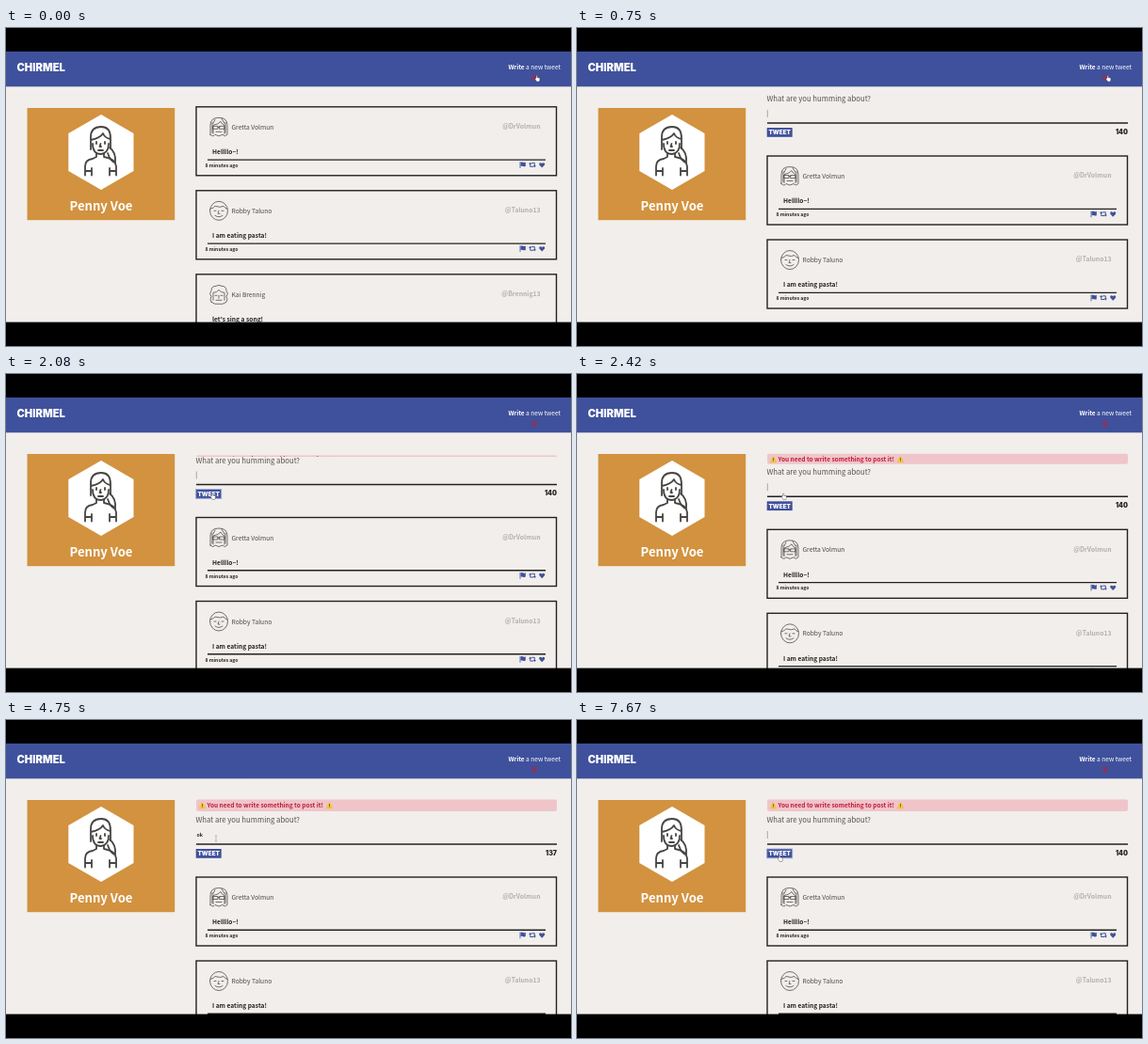
Recreate the animation shown at these times as an HTML page. Size 600 by 338 pixels, loop 8 s.

```html
<!DOCTYPE html>
<html lang="en">
<head>
<meta charset="utf-8">
<style>
html, body { margin: 0; height: 100%; overflow: hidden; background: #000; }
svg { display: block; width: 600px; height: 338px; }
text { font-family: "Noto Sans CJK JP", "Noto Sans CJK SC", "Noto Sans CJK", "Open Sans", sans-serif; fill: #252422; white-space: pre; }
.b { font-weight: 700; }
.block { font-family: Inter, sans-serif; font-weight: 900; }
.line { fill: none; stroke: #474543; stroke-linecap: round; stroke-linejoin: round; }
.rule { stroke: #222; stroke-width: 1.4; fill: none; }
.blue { fill: #3f519c; }
.white { fill: #fff; }
.end { text-anchor: end; }
</style>
</head>
<body>
<svg viewBox="0 0 600 338">
  <defs>
    <clipPath id="errClip"><rect id="errWindow" x="202" width="383" rx="1.8"/></clipPath>
    <g id="warn">
      <path d="M3.5 .5L6.8 6.8H.2Z" fill="#f8cf2c" stroke="#f0b921" stroke-width=".6" stroke-linejoin="round"/>
      <path d="M3.5 2.4V4.6M3.5 5.5V6.1" stroke="#333" stroke-width=".8"/>
    </g>
    <g id="icons" class="blue">
      <path d="M545.6 -3.4H546.4V3.4H545.6ZM546.7 -3Q548.3 -3.5 549.3 -2.8T551.8 -3V1.3Q550.5 2 549.2 1.4T546.7 1.3Z"/>
      <path d="M556.7 -1.8V1.7H560M558.2 -2H561.3V1.6" fill="none" stroke="#3f519c"/>
      <path d="M555 -.9L556.7 -2.8L558.4 -.9ZM559.6 .7L561.3 2.6L563 .7Z"/>
      <path d="M569.2 2.9L566.6 .2C565.2 -1.8 567.6 -3.6 569.2 -1.6C570.8 -3.6 573.2 -1.8 571.8 .2Z"/>
    </g>
  </defs>

  <rect y="25" width="600" height="288" fill="#f2eeeb"/>

  <rect x="22.5" y="85" width="156.7" height="119.2" fill="#d2923f"/>
  <path class="white" d="M101 92L135.5 112V152L101 172L66.300 152V112Z"/>
  <g class="line" stroke-width="1.8">
    <path d="M90 129V116Q90 105 101 105Q111 105 111 117V128M90 119Q100 117 103 112Q105 117 111 118"/>
    <path d="M92 123Q92 134 101 134Q109 133 109 123M96 121V123M105 121V123M100.500 123L99.500 126H101M98 130H103"/>
    <path d="M110 127Q117 132 116 143Q111 142 108 133"/>
    <path d="M84 156.500V147Q84 140 92 139L96 137V133M104 134V137Q116 139 117 147V156.500M91 149V156.500M110 149V156.500M84 152H90M111 152H117"/>
  </g>
  <text class="b white" x="101" y="194.300" font-size="13.1" text-anchor="middle">Penny Voe</text>

  <g id="column">
    <g id="form">
      <text x="201.500" y="-58" font-size="7.75" style="fill:#56534f">What are you humming about?</text>
      <text class="b" id="typed" x="202.500" y="-42.600" font-size="5.25"></text>
      <path id="caret" d="M0 -49V-41" stroke="#777" stroke-width=".6"/>
      <path class="rule" d="M202 -35H585"/>
      <rect class="blue" id="button" x="201.700" y="-30" width="27" height="9.800" stroke="#9ca8d4" stroke-width="0"/>
      <text class="block white" x="215.200" y="-22.700" font-size="6.4" text-anchor="middle">TWEET</text>
      <text class="block end" id="count" x="585" y="-23.500" font-size="7"></text>
    </g>
    <g id="cards"></g>
  </g>

  <g id="error" clip-path="url(#errClip)">
    <rect x="202" y="80" width="383" height="20" fill="#efc5ca"/>
    <use href="#warn" x="205" y="87"/>
    <text class="b" x="213.500" y="93.200" font-size="6.5" style="fill:#c01b3b">You need to write something to post it!</text>
    <use href="#warn" x="340" y="87"/>
  </g>

  <rect y="25" width="600" height="37.300" fill="#3f519c"/>
  <text class="block white" x="11.500" y="46" font-size="11.2">CHIRMEL</text>
  <text class="white end" x="589" y="44.300" font-size="6.55"><tspan class="b">Write</tspan> a new tweet</text>
  <path d="M558.300 50L561 52L563.700 50M558.300 53L561 55L563.700 53" fill="none" stroke="#b3233f" stroke-width="1.3"/>

  <g id="mouse">
    <path id="hand" d="M1.600 3V.8Q2.200 0 2.800 .8V2.600L5.400 3.200V5.200L4.600 7H2.200L.3 4.200Z" fill="#fff" stroke="#333" stroke-width=".4"/>
    <path id="beam" d="M1 0H3M1 6H3M2 0V6" fill="none" stroke="#999" stroke-width=".6"/>
  </g>

  <rect width="600" height="25"/>
  <rect y="312.600" width="600" height="26"/>
</svg>
<script>
const $ = id => document.getElementById(id);

const faces = [
  // long hair and glasses
  `M-9 8V-2Q-9 -10 0 -10T9 -2V8Q6 11 4 8Q0 11 -4 8Q-6 11 -9 8ZM-6 7V-2Q0 -3 2 -6Q3 -3 6 -2V7
   M-6 -1H-1V2H-6ZM1 -1H6V2H1ZM-1 0H1M-3 5H3M-7 -5V6M7 -5V6M-4 -8L-6 -4M3 -9L6 -4`,
  // round face, short hair
  `M-9.500 0A9.500 10 0 0 1 9.500 0A9.500 10 0 0 1 -9.500 0M-9 -2Q-5 -3 -4 -5Q2 -3 5 -5Q6 -3 9 -2
   M-5 0H-3M3 0H5M0 0L-1 3H1M-4 5Q0 8 4 5`,
  // wavy hair
  `M-8 8Q-10 5 -8 2Q-11 -1 -8 -4Q-8 -9 -3 -9Q0 -11 3 -9Q8 -9 8 -4Q11 -1 8 2Q10 5 8 8
   Q4 11 0 10Q-4 11 -8 8M-6 6V-2Q-2 -2 0 -5Q2 -2 6 -2V6M-4 1H-2M2 1H4M0 1V4M-3 6H3`
];
const posts = [
  ["Gretta Volmun", "@DrVolmun", "Hellllo~!"],
  ["Robby Taluno", "@Taluno13", "I am eating pasta!"],
  ["Kai Brennig", "@Brennig13", "let's sing a song!"]
];
$("cards").innerHTML = posts.map(([name, handle, text], i) => `
  <g transform="translate(0 ${i * 89})">
    <rect class="rule" x="202" width="382.500" height="73"/>
    <path class="line" stroke-width=".75" transform="translate(226 21.500)" d="${faces[i]}"/>
    <text x="239.500" y="24" font-size="6.7" font-weight="300" style="fill:#4a4846">${name}</text>
    <text class="b end" x="567.500" y="23.200" font-size="6.8" style="fill:#b4b0ae">${handle}</text>
    <text class="b" x="219" y="50.200" font-size="6.65">${text}</text>
    <path class="rule" d="M214 56.300H573"/>
    <text class="b" x="211.500" y="64" font-size="5.1">8 minutes ago</text>
    <use href="#icons" y="61.800"/>
  </g>`).join("");

const LOOP = 8000, SENT = 7620;
const keys = [4420, 4580, 4740, 4910, 4990, 5160, 5240, 5320, 5490, 5740, 5910, 6240, 6410, 6660];
const clamp = v => Math.min(1, Math.max(0, v));
const swing = (t, start, span) => 0.5 - Math.cos(clamp((t - start) / span) * Math.PI) / 2;
const mix = (a, b, p) => a + (b - a) * p;

function typedAt(t) {
  if (t >= SENT) return "";
  if (t >= 7160) return "ok I will type";
  if (t >= 6990) return "ok I will typ";
  return "ok I will typp".slice(0, keys.filter(k => k <= t).length);
}

function draw(t) {
  const open = swing(t, 336, 600), err = swing(t, 1945, 600);
  const top = 83.8 + 66.7 * open + 16.5 * err;
  $("column").setAttribute("transform", `translate(0 ${top})`);
  $("form").style.display = open ? "" : "none";

  $("error").style.display = err ? "" : "none";
  $("errWindow").setAttribute("y", mix(86.8, 84.4, err));
  $("errWindow").setAttribute("height", 12.5 * err);

  const text = typedAt(t);
  $("typed").textContent = text;
  $("count").textContent = 140 - text.length;
  const width = text ? $("typed").getComputedTextLength() + 0.4 : 0;
  $("caret").setAttribute("transform", `translate(${202.3 + width} 0)`);
  $("caret").style.display = t > 4600 && t < 4900 ? "none" : "";

  // link, button, text field, button again
  const a = swing(t, 950, 800), b = swing(t, 3350, 750), c = swing(t, 7240, 280);
  const x = mix(mix(mix(561.5, 217, a), 221, b), 213, c);
  const y = mix(mix(mix(50, 126.5, a), 123, b), 143.5, c);
  $("mouse").setAttribute("transform", `translate(${x} ${y})`);
  $("mouse").style.display = t > 4850 && t < 7240 ? "none" : "";
  const overText = b > 0 && c < 0.6;
  $("hand").style.display = overText ? "none" : "";
  $("beam").style.display = overText ? "" : "none";
  const hover = (a > 0.97 && t < 2300) || c > 0.9;
  $("button").setAttribute("stroke-width", hover ? 0.9 : 0);
}

const begin = performance.now();
(function frame() {
  draw((performance.now() - begin) % LOOP);
  requestAnimationFrame(frame);
})();
</script>
</body>
</html>
```
